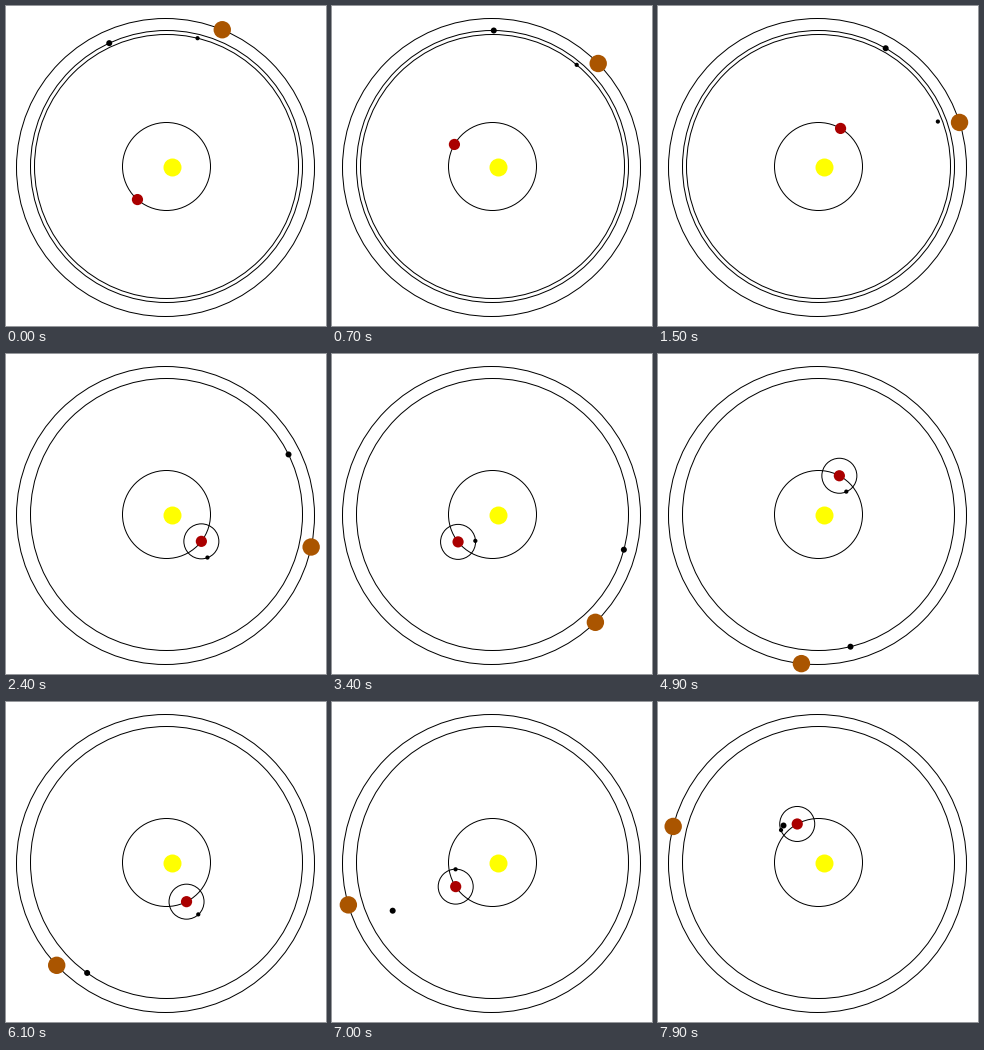
A matplotlib script for the animation above (8000 ms loop, 320 by 320 pixels).

```python
import numpy as np
import matplotlib.pyplot as plt
from matplotlib.animation import FuncAnimation
from matplotlib.patches import Circle

SIZE, DPI = 320, 100
FRAMES, STEP = 80, 100
CENTER = (160.5, 160.5)
GIANT_CENTER = (159.5, 161.5)
MOON_LEAVES, CAPTURE = 14, 21
DWARF_LEAVES, DWARF_ARRIVES = 64, 79

# Clockwise angles from the top, in degrees, at key steps; all pause at 67-68.
KEYS = [0, 15, 21, 24, 34, 49, 61, 67, 68, 79]
GIANT = [22.4, 72.4, 92.2, 102.2, 135.8, 186.2, 226.9, 247.1, 247.1, 284.4]
RED = [-138.7, 30.1, 96.8, 127.6, 231.5, 388.3, 512.9, 575.8, 575.8, 691.1]
DWARF_KEYS = [0, 15, 21, 24, 34, 49, 61, 64]
DWARF = [-24.9, 29.6, 51.4, 63.8, 105, 166.4, 215.7, 228]
MOON_KEYS = [21, 24, 34, 49, 61, 67, 68, 79]
MOON = [73.6, 159.4, 446.6, 876.4, 1217.3, 1384, 1384, 1689.4]


def orbit(center, radius, degrees):
    a = np.radians(degrees)
    return center[0] + radius * np.sin(a), center[1] - radius * np.cos(a)


def bezier(p0, p1, p2, t):
    p0, p1, p2 = map(np.array, (p0, p1, p2))
    return tuple((1 - t) ** 2 * p0 + 2 * t * (1 - t) * p1 + t * t * p2)


def red_pos(i):
    return orbit(CENTER, 44, np.interp(i, KEYS, RED))


def moon_pos(i):
    if i <= MOON_LEAVES:
        return orbit(CENTER, 132, 13.6 + 3.72 * i)
    if i < CAPTURE:
        t = (i - MOON_LEAVES) / (CAPTURE - MOON_LEAVES)
        return bezier(moon_pos(MOON_LEAVES), (282, 140), moon_pos(CAPTURE), t)
    return orbit(red_pos(i), 17.3, np.interp(i, MOON_KEYS, MOON))


def dwarf_pos(i):
    if i <= DWARF_LEAVES:
        return orbit(CENTER, 136, np.interp(i, DWARF_KEYS, DWARF))
    t = (i - DWARF_LEAVES) / (DWARF_ARRIVES - DWARF_LEAVES)
    return bezier(dwarf_pos(DWARF_LEAVES), (40, 205), (125.5, 123.5), t)


fig = plt.figure(figsize=(SIZE / DPI, SIZE / DPI), dpi=DPI, facecolor="white")
ax = fig.add_axes([0, 0, 1, 1])
ax.set_xlim(0, SIZE)
ax.set_ylim(SIZE, 0)
ax.axis("off")


def ring(center, radius):
    return ax.add_patch(Circle(center, radius, fill=False, ec="black",
                               lw=72 / DPI, zorder=1))


def ball(radius, color, center=CENTER, z=2):
    return ax.add_patch(Circle(center, radius, fc=color, lw=0, zorder=z))


ring(GIANT_CENTER, 149)
ring(CENTER, 136)
ring(CENTER, 44)
moon_ring = ring(CENTER, 132)
red_ring = ring(CENTER, 17.5)
ball(9, "#ffff00", (166.5, 161.5))
giant = ball(8.7, "#aa5500")
red = ball(5.6, "#aa0000")
dwarf = ball(3, "black", z=3)
moon = ball(2.1, "black", z=3)


def update(i):
    giant.center = orbit(GIANT_CENTER, 149, np.interp(i, KEYS, GIANT))
    red.center = red_ring.center = red_pos(i)
    dwarf.center = dwarf_pos(i)
    moon.center = moon_pos(i)
    moon_ring.set_visible(i < CAPTURE)
    red_ring.set_visible(i >= CAPTURE)
    return giant, red, red_ring, moon_ring, dwarf, moon


anim = FuncAnimation(fig, update, frames=FRAMES, interval=STEP,
                     repeat=True, repeat_delay=0, blit=False)
plt.show()
```
